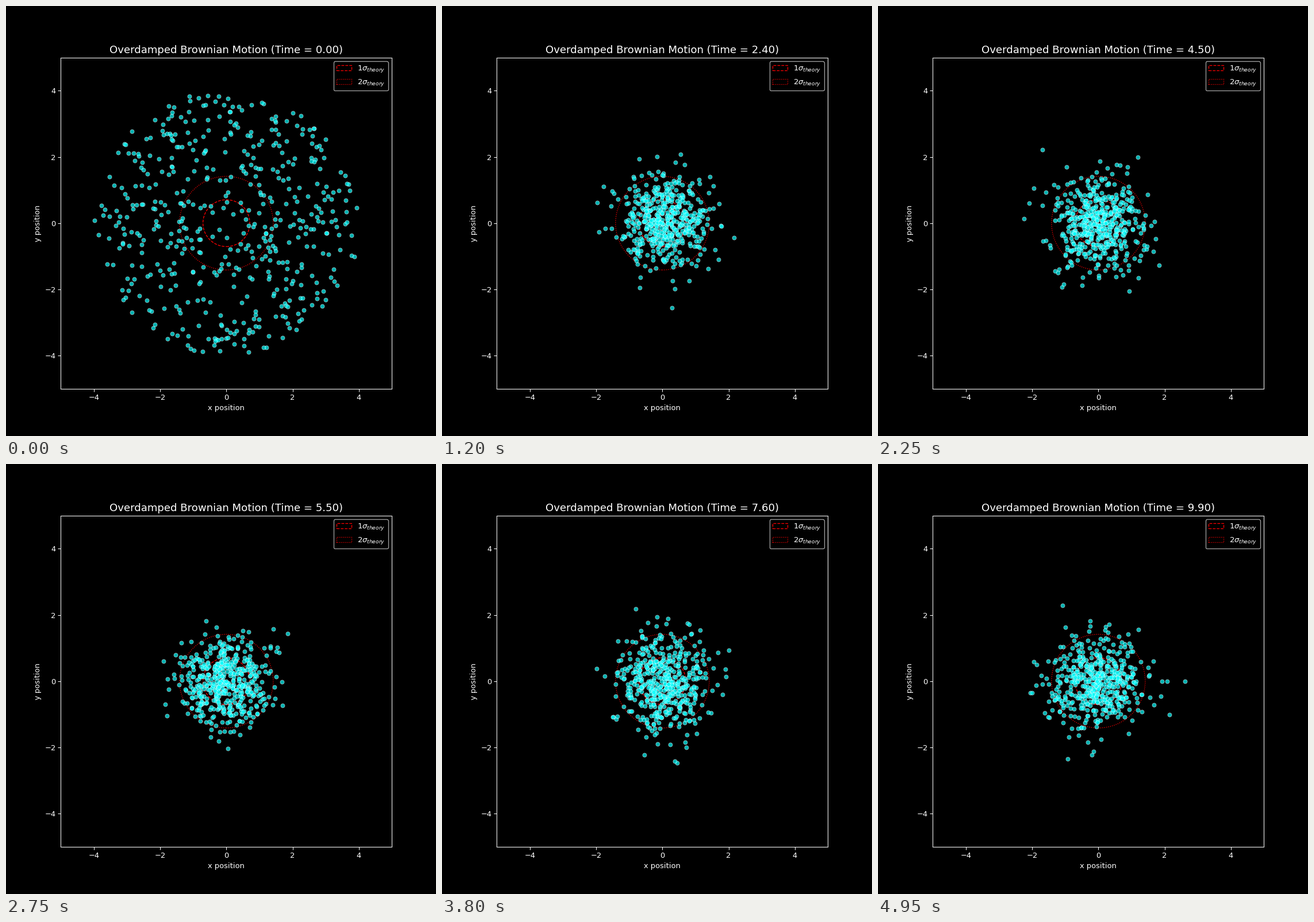
Animation, 748 px wide and 748 px high, one loop 5000 ms. Source, as a matplotlib script:

```python
import matplotlib.pyplot as plt
import numpy as np
from matplotlib.animation import FuncAnimation

COUNT = 500
FRAMES = 100
INTERVAL = 50  # ms
DT = 0.1
STIFFNESS = 1.0
TEMPERATURE = 0.5
START_RADIUS = 4.0
SIGMA = np.sqrt(TEMPERATURE / STIFFNESS)


def simulate(rng):
    """Positions of all particles in a harmonic trap, one row per frame."""
    radius = START_RADIUS * np.sqrt(rng.random(COUNT))
    angle = 2 * np.pi * rng.random(COUNT)
    path = np.empty((FRAMES, COUNT, 2))
    path[0] = np.column_stack([radius * np.cos(angle), radius * np.sin(angle)])
    decay = np.exp(-STIFFNESS * DT)
    kick = SIGMA * np.sqrt(1 - decay**2)
    for i in range(1, FRAMES):
        path[i] = decay * path[i - 1] + kick * rng.standard_normal((COUNT, 2))
    return path


def title_at(frame):
    return f"Overdamped Brownian Motion (Time = {frame * DT:.2f})"


plt.style.use("dark_background")
plt.rcParams["font.family"] = "DejaVu Sans"

path = simulate(np.random.default_rng(42))

fig, ax = plt.subplots(figsize=(8, 8), dpi=93.5)
ax.set_xlim(-5, 5)
ax.set_ylim(-5, 5)
ax.set_aspect("equal")
ax.set_xlabel("x position")
ax.set_ylabel("y position")
title = ax.set_title(title_at(0), fontsize=14)

for n, style in ((1, "--"), (2, ":")):
    ax.add_patch(plt.Circle((0, 0), n * SIGMA, color="red", fill=False,
                            linestyle=style,
                            label=rf"${n}\sigma_{{theory}}$"))

dots = ax.scatter(path[0, :, 0], path[0, :, 1], s=30, c="cyan", alpha=0.7,
                  edgecolors="white", linewidths=0.5)
ax.legend(loc="upper right")


def update(frame):
    dots.set_offsets(path[frame])
    title.set_text(title_at(frame))
    return dots, title


anim = FuncAnimation(fig, update, frames=FRAMES, interval=INTERVAL,
                     repeat=True, repeat_delay=0, blit=False)
plt.show()
```
